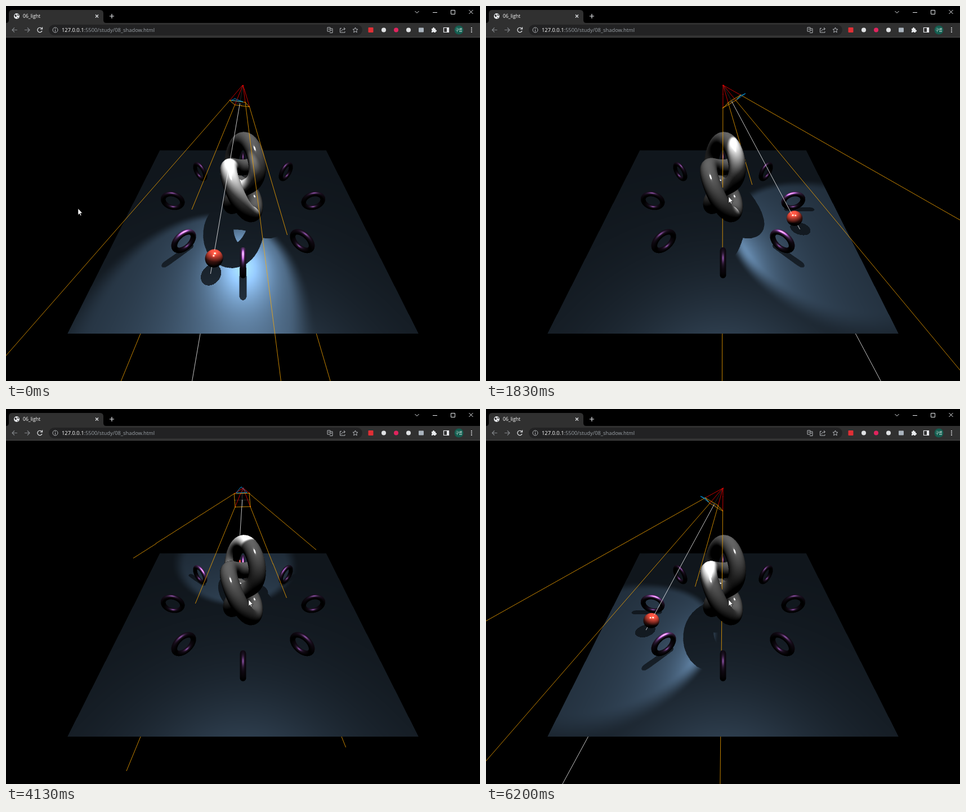
Animation, 842 px wide and 665 px high, one loop 6230 ms. Source, as an HTML page with a canvas:

```html
<!DOCTYPE html>
<html lang="en">
<head>
<meta charset="utf-8">
<title>06_light</title>
<style>
  html, body { margin: 0; width: 842px; height: 665px; overflow: hidden; background: #000; }
  canvas { position: absolute; left: 0; top: 56px; }
  svg { position: absolute; left: 0; top: 0; }
  text { font-family: "Open Sans", "Noto Sans", sans-serif; }
</style>
</head>
<body>
<canvas id="stage" width="842" height="609"></canvas>
<svg width="842" height="665" fill="none" stroke="#e8eaed" stroke-width="1.2">
  <g stroke="none">
    <path d="M0 0H842V56H0Z" fill="#000"/>
    <path d="M0 30V30Q5 30 5 25V13Q5 7 11 7H167Q173 7 173 13V25Q173 30 178 30H842V55H0Z" fill="#303030"/>
    <path d="M0 55H842V56H0Z" fill="#484848"/>
    <rect x="76" y="33" width="557" height="19" rx="9.5" fill="#222223"/>
    <circle cx="19" cy="18" r="5" fill="#e8eaed"/>
    <path d="M15 16L18 15L19 18L17 20ZM20 14L23 16L21 18ZM20 20L22 20L20 22Z" fill="#303030"/>
    <text x="30" y="21" font-size="8.6" fill="#fff">06_light</text>
    <text x="99" y="46" font-size="9.35" fill="#9aa0a6"><tspan fill="#fff">127.0.0.1</tspan>:5500/study/08_shadow.html</text>
    <rect x="643.5" y="38" width="9" height="9" rx="1" fill="#e02f35"/>
    <circle cx="671" cy="42.5" r="4" fill="#dfe1e3"/>
    <circle cx="693" cy="42.5" r="4" fill="#e0245e"/>
    <circle cx="715" cy="42.5" r="4" fill="#dfe1e3"/>
    <rect x="733" y="38.5" width="9" height="8" rx="1" fill="#aab4be"/>
    <path d="M756 40H758V39A1.6 1.6 0 0 1 761 39V40H763V42.5H764A1.6 1.6 0 0 1 764 45.5H763V47H760.5A1.6 1.6 0 0 0 757.5 47H756V44.5A1.6 1.6 0 0 0 756 42Z" fill="#e8eaed"/>
    <circle cx="804.5" cy="42.5" r="8" fill="#135e50"/>
    <text x="804.5" y="45" font-size="6.5" text-anchor="middle" fill="#fff" style="font-family:'Noto Sans CJK KR','Noto Sans CJK',sans-serif">구름</text>
    <g fill="#e8eaed"><circle cx="827" cy="39" r="1.1"/><circle cx="827" cy="42.5" r="1.1"/><circle cx="827" cy="46" r="1.1"/></g>
  </g>
  <path d="M159 15.5L164 20.5M164 15.5L159 20.5M188 14V22M184 18H192"/>
  <path d="M726.5 9L730 12.5L733.5 9M758 11.5H766M790.5 7.5H797.5V14.5H790.5ZM822.5 7L829.5 14M829.5 7L822.5 14" stroke-width="1"/>
  <path d="M20 42.5H11M15 38.5L11 42.5L15 46.5M33 42.5H42M38 38.5L42 42.5L38 46.5" stroke="#808387"/>
  <path d="M63.5 40A4.2 4.2 0 1 0 64 44M64.5 37.5V41H61"/>
  <g stroke="#b4b7bb" stroke-width="1">
    <circle cx="87.5" cy="42.5" r="4.5"/><path d="M87.5 42V45.5M87.5 39.5V41"/>
    <path d="M571 38H576V45H571ZM576 40H580V47.5H575M572.5 41H575M577 43H579"/>
    <path d="M596 39.5H593.5V47H602V45M596 45Q596 41 602 40.5M600 38L602.5 40.5L600 43"/>
    <path d="M620.5 38L621.8 41L625 41.3L622.6 43.5L623.3 46.8L620.5 45L617.7 46.8L618.4 43.5L616 41.3L619.2 41Z"/>
  </g>
  <path d="M777.5 38.5H786.5V46.5H777.5Z"/>
  <path d="M783 38.5H786.5V46.5H783Z" fill="#e8eaed" stroke="none"/>
  <path id="cursor" d="M0 0V11.5L2.6 9.2L4.3 13L6 12.2L4.3 8.5H7.8Z" fill="#fff" stroke="#000" stroke-width=".6"/>
</svg>
<script>
const W = 842, H = 609, N = W * H, RAD = Math.PI / 180, C = Math.SQRT1_2;
const FOCAL = H / 2 / Math.tan(37.5 * RAD);
const EYE = 7, LIGHT_Y = 5, REACH = Math.hypot(3, 4.5), BALL = 0.3;
// The wire frame keeps a 50 degree view while the lamp itself opens to 60
const CONE = 30 * RAD, COS_OUT = Math.cos(CONE), COS_IN = Math.cos(CONE * 0.8), WIRE = 25 * RAD;
const COS_BALL = Math.sqrt(1 - (BALL / REACH) ** 2);

function material(hex, roughness, metal) {
  const rgb = [16, 8, 0].map(s => (hex >> s & 255) / 255);
  return {
    a2: roughness ** 4,
    diffuse: rgb.map(c => c * (1 - metal)),
    f0: rgb.map(c => 0.04 * (1 - metal) + c * metal)
  };
}
const GROUND = material(0x2c3e50, 0.5, 0.5), KNOT = material(0xffffff, 0.14, 0.2);
const RING = material(0x9b59b6, 0.6, 0.9), RED = material(0xe74c3c, 0.24, 0.2);

// ---- vectors and meshes
const add = (a, b, k = 1) => [a[0] + b[0] * k, a[1] + b[1] * k, a[2] + b[2] * k];
const cross = (a, b) => [a[1] * b[2] - a[2] * b[1], a[2] * b[0] - a[0] * b[2], a[0] * b[1] - a[1] * b[0]];
const unit = a => { const l = Math.hypot(...a); return [a[0] / l, a[1] / l, a[2] / l]; };

function mesh(mat, nu, nv, point) {
  const pts = [];
  for (let i = 0; i <= nu; i++)
    for (let j = 0; j <= nv; j++) pts.push(point(i / nu * 2 * Math.PI, j / nv * 2 * Math.PI));
  return { mat, nu, nv, pts };
}

function knotCurve(u) {
  const q = 1.5 * u, r = (2 + Math.cos(q)) / 2;
  return [r * Math.cos(u), r * Math.sin(u), Math.sin(q) / 2];
}

function knotPoint(u, v) {
  const a = knotCurve(2 * u), b = knotCurve(2 * u + 0.01), t = add(b, a, -1);
  const bi = unit(cross(t, add(a, b))), side = unit(cross(bi, t));
  const n = add(side.map(x => -Math.cos(v) * x), bi, Math.sin(v));
  return { p: add(add(a, n, 0.3), [0, 1.6, 0]), n };
}

const ringPoint = angle => (u, v) => {
  const c = Math.cos(angle), s = Math.sin(angle), cv = Math.cos(v), sv = Math.sin(v);
  const nr = cv * Math.cos(u), n = [nr * c + sv * s, cv * Math.sin(u), -nr * s + sv * c];
  const r = 3 + 0.4 * Math.cos(u);
  return { p: add([r * c, 0.5 + 0.4 * Math.sin(u), -r * s], n, 0.1), n };
};

const meshes = [mesh(KNOT, 128, 40, knotPoint)];
for (let i = 0; i < 8; i++) meshes.push(mesh(RING, 32, 24, ringPoint(i * 45 * RAD)));

// ---- rasteriser: q is the inverse depth, the largest one wins
function raster({ pts, nu, nv }, project, w, h, zb, hit) {
  const s = pts.map(o => project(o.p));
  const tri = (ia, ib, ic) => {
    const a = s[ia], b = s[ib], c = s[ic];
    const bx = b.x - a.x, by = b.y - a.y, cx = c.x - a.x, cy = c.y - a.y, area = bx * cy - by * cx;
    if (!area) return;
    const x0 = Math.max(0, Math.ceil(Math.min(a.x, b.x, c.x))), x1 = Math.min(w - 1, Math.max(a.x, b.x, c.x));
    const y0 = Math.max(0, Math.ceil(Math.min(a.y, b.y, c.y))), y1 = Math.min(h - 1, Math.max(a.y, b.y, c.y));
    for (let y = y0; y <= y1; y++) for (let x = x0; x <= x1; x++) {
      const kb = ((x - a.x) * cy - (y - a.y) * cx) / area, kc = (bx * (y - a.y) - by * (x - a.x)) / area;
      const ka = 1 - kb - kc;
      if (ka < -1e-6 || kb < -1e-6 || kc < -1e-6) continue;
      const q = ka * a.q + kb * b.q + kc * c.q, i = y * w + x;
      if (q <= zb[i]) continue;
      zb[i] = q;
      if (hit) hit(i, ka, kb, kc, pts[ia].n, pts[ib].n, pts[ic].n);
    }
  };
  for (let i = 0; i < nu; i++) for (let j = 0; j < nv; j++) {
    const a = i * (nv + 1) + j, b = a + nv + 1;
    tri(a, b, a + 1);
    tri(b, b + 1, a + 1);
  }
}

// ---- shadows of the fixed objects, seen straight down from the lamp
const M = 1536, MAP = M / 1.8, shadowMap = new Float32Array(M * M);
const fromLamp = ([x, y, z]) => {
  const q = 1 / (LIGHT_Y - y);
  return { x: M / 2 + MAP * x * q, y: M / 2 + MAP * z * q, q };
};
for (const m of meshes) raster(m, fromLamp, M, M, shadowMap);

function shadowed(x, y, z) {
  const d = LIGHT_Y - y, i = Math.round(M / 2 + MAP * x / d), j = Math.round(M / 2 + MAP * z / d);
  if (i < 0 || j < 0 || i >= M || j >= M) return false;
  const q = shadowMap[j * M + i];
  return q > 0 && 1 / q < d - 0.04;
}

// ---- GGX shading, adds to out[o..o+2]
function shade(out, o, m, power, nx, ny, nz, vx, vy, vz, lx, ly, lz) {
  const nl = nx * lx + ny * ly + nz * lz;
  if (nl <= 0) return;
  const nv = Math.max(0, nx * vx + ny * vy + nz * vz);
  const hx = lx + vx, hy = ly + vy, hz = lz + vz, hl = Math.hypot(hx, hy, hz) || 1;
  const nh = Math.min(1, Math.max(0, (nx * hx + ny * hy + nz * hz) / hl)), vh = (vx * hx + vy * hy + vz * hz) / hl;
  const k = 1 - m.a2, e = 1 - nh * nh * k;
  const vis = 0.5 / (nl * Math.sqrt(m.a2 + k * nv * nv) + nv * Math.sqrt(m.a2 + k * nl * nl) + 1e-6);
  const spec = m.a2 / (e * e) * vis, fr = Math.pow(2, (-5.55473 * vh - 6.98316) * vh);
  for (let c = 0; c < 3; c++)
    out[o + c] += 255 * power * nl * (m.diffuse[c] + spec * (m.f0[c] * (1 - fr) + fr));
}

function lightPoint(base, spot, o, m, x, y, z, nx, ny, nz, power = 1) {
  const ex = EYE - x, ey = EYE - y, el = Math.hypot(ex, ey, z), d = Math.hypot(x, LIGHT_Y - y, z);
  const vx = ex / el, vy = ey / el, vz = -z / el;
  shade(base, o, m, 0.5 * power, nx, ny, nz, vx, vy, vz, 0, 1, 0);
  if (!shadowed(x, y, z))
    shade(spot, o, m, power, nx, ny, nz, vx, vy, vz, -x / d, (LIGHT_Y - y) / d, -z / d);
  return d;
}

// ---- fixed part of the picture, four samples per pixel
const base = new Float32Array(3 * N), spot = new Float32Array(3 * N), ray = new Float32Array(4 * N);
const fixedDepth = new Float32Array(N), normals = new Float32Array(3 * N), owner = new Uint8Array(N);
const view = ([x, y, z]) => ({ r: -z, u: (y - x) * C, w: (2 * EYE - x - y) * C });

for (const [jx, jy] of [[-.25, -.25], [.25, -.25], [-.25, .25], [.25, .25]]) {
  fixedDepth.fill(0);
  const project = p => {
    const { r, u, w } = view(p);
    return { x: W / 2 + FOCAL * r / w - 0.5 - jx, y: H / 2 - FOCAL * u / w - 0.5 - jy, q: 1 / w };
  };
  meshes.forEach((m, id) => raster(m, project, W, H, fixedDepth, (i, ka, kb, kc, a, b, c) => {
    for (let k = 0; k < 3; k++) normals[3 * i + k] = ka * a[k] + kb * b[k] + kc * c[k];
    owner[i] = id;
  }));
  for (let i = 0; i < N; i++) {
    const r = (i % W + 0.5 + jx - W / 2) / FOCAL, u = (H / 2 - (i / W | 0) - 0.5 - jy) / FOCAL;
    const qGround = C * (1 - u) / EYE;
    let m = meshes[owner[i]].mat, nx = normals[3 * i], ny = normals[3 * i + 1], nz = normals[3 * i + 2];
    if (qGround > fixedDepth[i] && Math.abs(r / qGround) <= 5 && Math.abs(EYE - C * (1 + u) / qGround) <= 5) {
      fixedDepth[i] = qGround;
      m = GROUND; nx = nz = 0; ny = 1;
    }
    if (!fixedDepth[i]) continue;
    const w = 1 / fixedDepth[i], x = EYE - w * C * (1 + u), y = EYE - w * C * (1 - u), z = -w * r;
    const nl = Math.hypot(nx, ny, nz);
    const d = lightPoint(base, spot, 3 * i, m, x, y, z, nx / nl, ny / nl, nz / nl, 0.25);
    ray.set([x / d, (y - LIGHT_Y) / d, z / d, d], 4 * i);
  }
}

const ctx = stage.getContext('2d'), image = ctx.createImageData(W, H), px = image.data;
const still = new Uint8ClampedArray(4 * N), depth = new Float32Array(N), lit = [];
for (let i = 0; i < N; i++) {
  for (let c = 0; c < 3; c++) still[4 * i + c] = base[3 * i + c];
  still[4 * i + 3] = 255;
  if (spot[3 * i] + spot[3 * i + 1] + spot[3 * i + 2] > 0) lit.push(i);
}
const litPixels = Uint32Array.from(lit);

// ---- moving parts
function blend(i, r, g, b, a) {
  const o = 4 * i;
  px[o] += (r - px[o]) * a;
  px[o + 1] += (g - px[o + 1]) * a;
  px[o + 2] += (b - px[o + 2]) * a;
}

function spotlight([dx, dy, dz]) {
  for (let k = 0; k < litPixels.length; k++) {
    const i = litPixels[k], j = 4 * i, o = 3 * i;
    const c = ray[j] * dx + ray[j + 1] * dy + ray[j + 2] * dz;
    if (c <= COS_OUT || c > COS_BALL && ray[j + 3] > REACH) continue;
    let s = Math.min(1, (c - COS_OUT) / (COS_IN - COS_OUT));
    s *= s * (3 - 2 * s);
    px[j] = base[o] + s * spot[o];
    px[j + 1] = base[o + 1] + s * spot[o + 1];
    px[j + 2] = base[o + 2] + s * spot[o + 2];
  }
}

function ball(center) {
  const v = view(center), cx = Math.round(W / 2 + FOCAL * v.r / v.w), cy = Math.round(H / 2 - FOCAL * v.u / v.w);
  const oc = add(center, [EYE, EYE, 0], -1), oc2 = oc[0] ** 2 + oc[1] ** 2 + oc[2] ** 2;
  for (let y = cy - 24; y < cy + 24; y++) for (let x = cx - 24; x < cx + 24; x++) {
    const r = (x + 0.5 - W / 2) / FOCAL, u = (H / 2 - y - 0.5) / FOCAL;
    const d = [-C * (1 + u), -C * (1 - u), -r], dd = 1 + r * r + u * u;
    const near = (d[0] * oc[0] + d[1] * oc[1] + d[2] * oc[2]) / dd;
    const miss = Math.sqrt(Math.max(0, oc2 - near * near * dd));
    const cover = Math.min(1, (BALL - miss) * FOCAL / near + 0.5);
    if (cover <= 0) continue;
    const w = near - Math.sqrt(Math.max(0, BALL * BALL - miss * miss) / dd), i = y * W + x;
    if (1 / w <= depth[i]) continue;
    const p = add([EYE, EYE, 0], d, w), n = unit(add(p, center, -1)), rgb = [0, 0, 0];
    lightPoint(rgb, rgb, 0, RED, ...p, ...n);
    blend(i, ...rgb.map(c => Math.min(255, c)), cover);
    if (cover > 0.5) depth[i] = 1 / w;
  }
}

function line(p0, p1, color) {
  let a = view(p0), b = view(p1);
  const mix = (f, g, k) => ({ r: f.r + (g.r - f.r) * k, u: f.u + (g.u - f.u) * k, w: f.w + (g.w - f.w) * k });
  const clip = (f, g) => {
    const edge = f.w < 0.5 ? 0.5 : f.w > 100 ? 100 : f.w;
    return edge === f.w ? f : mix(f, g, (edge - f.w) / (g.w - f.w));
  };
  [a, b] = [clip(a, b), clip(b, a)];
  const sx = v => W / 2 + FOCAL * v.r / v.w - 0.5, sy = v => H / 2 - FOCAL * v.u / v.w - 0.5;
  const x0 = sx(a), y0 = sy(a), dx = sx(b) - x0, dy = sy(b) - y0, q0 = 1 / a.w, dq = 1 / b.w - q0;
  const steep = Math.abs(dy) > Math.abs(dx), n = Math.ceil(Math.max(Math.abs(dx), Math.abs(dy), 1));
  const dot = (x, y, q, k) => {
    if (x < 0 || y < 0 || x >= W || y >= H) return;
    const i = y * W + x;
    if (q > depth[i]) blend(i, ...color, 0.77 * k);
  };
  for (let s = 0; s <= n; s++) {
    const x = x0 + dx * s / n, y = y0 + dy * s / n, q = q0 + dq * s / n;
    if (x < -2 || y < -2 || x > W + 1 || y > H + 1) continue;
    const fx = Math.floor(x), fy = Math.floor(y);
    if (steep) {
      dot(fx, Math.round(y), q, 1 - x + fx);
      dot(fx + 1, Math.round(y), q, x - fx);
    } else {
      dot(Math.round(x), fy, q, 1 - y + fy);
      dot(Math.round(x), fy + 1, q, y - fy);
    }
  }
}

// Wire frame of the shadow camera: frustum, cone, up mark, aim and crosses
function frustum(angle) {
  const c = Math.cos(angle), s = Math.sin(angle), dir = aim(angle), lamp = [0, LIGHT_Y, 0];
  const right = [s, 0, c], up = cross(right, dir), slope = Math.tan(WIRE);
  const at = (x, y, dist) => add(lamp, add(add(dir, right, x * slope), up, y * slope), dist);
  const orange = [255, 170, 0], red = [255, 0, 0], blue = [0, 170, 255], white = [255, 255, 255], gray = [51, 51, 51];
  const near = 0.5, far = 500, corners = [[-1, -1], [1, -1], [1, 1], [-1, 1]], mark = [[.7, 1.1], [-.7, 1.1], [0, 2]];
  const loop = (list, color) => list.forEach((p, i) =>
    line(at(...p, near), at(...list[(i + 1) % list.length], near), color));
  line(at(-1, 0, near), at(1, 0, near), gray);
  line(at(0, -1, near), at(0, 1, near), gray);
  line(lamp, at(0, 0, near), gray);
  for (const p of corners) {
    line(at(...p, near), at(...p, far), orange);
    line(lamp, at(...p, near), red);
  }
  loop(corners, orange);
  loop(mark, blue);
  line(at(0, 0, near), at(0, 0, far), white);
}

const place = a => [3 * Math.cos(a), 0.5, -3 * Math.sin(a)];
const aim = a => unit(add(place(a), [0, LIGHT_Y, 0], -1));

// Orbit angle in degrees at a few times in seconds
const orbit = [[0, -19], [1.1, 33.6], [1.83, 70.3], [3.13, 136], [5.54, 255], [6.23, 290.3]];
function orbitAt(t) {
  const k = Math.max(1, orbit.findIndex(o => o[0] >= t)), [t0, a0] = orbit[k - 1], [t1, a1] = orbit[k];
  return (a0 + (a1 - a0) * (t - t0) / (t1 - t0)) * RAD;
}

function draw(t) {
  const angle = orbitAt(t);
  px.set(still);
  depth.set(fixedDepth);
  spotlight(aim(angle));
  ball(place(angle));
  frustum(angle - 0.6 * RAD);
  ctx.putImageData(image, 0, 0);
  const k = Math.min(1, Math.max(0, (t - 0.2) / 0.6)), e = k * k * (3 - 2 * k);
  cursor.setAttribute('transform', `translate(${128 + 303 * e} ${359 - 21 * e})`);
}

const start = performance.now();
let shown = -1;
function tick() {
  const frame = Math.min(186, Math.floor(((performance.now() - start) % 6230 + 4) * 0.03));
  if (frame !== shown) draw((shown = frame) / 30);
  requestAnimationFrame(tick);
}
tick();
</script>
</body>
</html>
```
